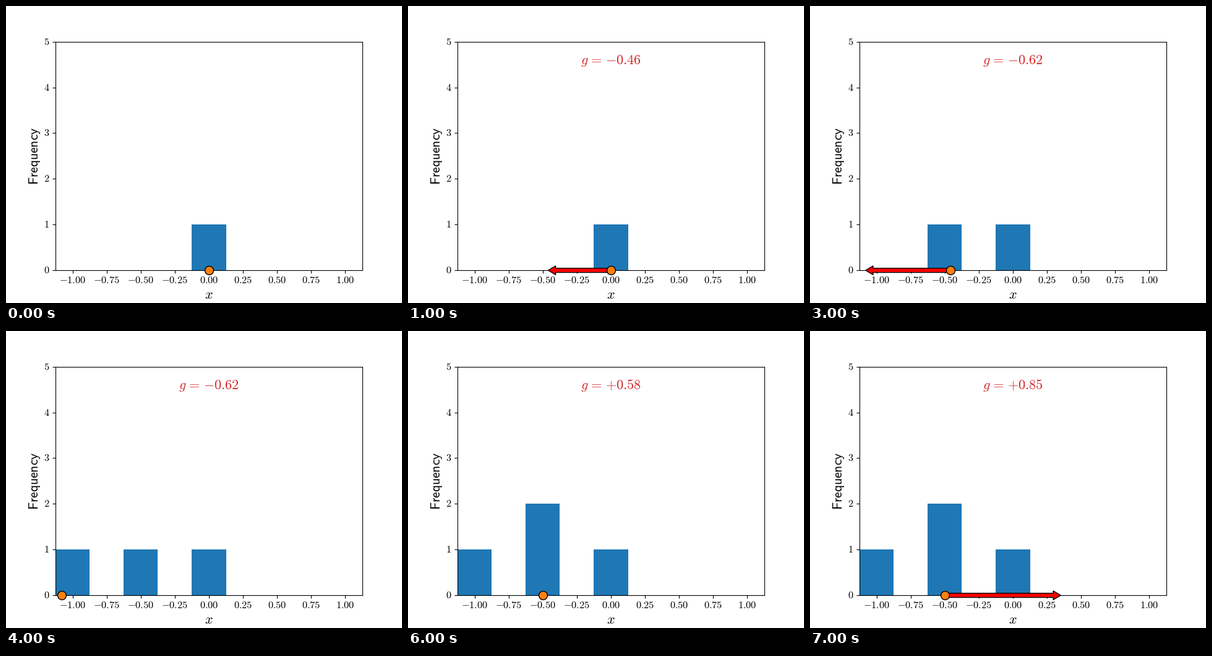
Recreate the animation shown at these times as a matplotlib script. Size 640 px wide and 480 px high, loop 8 s.

```python
import numpy as np
import matplotlib.pyplot as plt
from matplotlib.animation import FuncAnimation
from matplotlib.patches import Polygon
from matplotlib.transforms import ScaledTranslation

plt.rcParams["mathtext.fontset"] = "cm"

STEPS = [-0.46, -0.62, 0.58, 0.85]
PATH = np.concatenate([[0], np.cumsum(STEPS)])
WIDTH = 0.25
CENTERS = np.arange(-1, 1.01, WIDTH)
EDGES = np.append(CENTERS - WIDTH / 2, CENTERS[-1] + WIDTH / 2)
TICK_SIZE = 11.8

fig = plt.figure(figsize=(6.4, 4.8), dpi=100, facecolor="white")
ax = fig.add_axes([0.125, 0.11, 0.775, 0.77])
ax.set_xlim(EDGES[0], EDGES[-1])
ax.set_ylim(0, 5)
ax.set_xticks(CENTERS, [f"${c:.2f}$" for c in CENTERS], fontsize=TICK_SIZE)
ax.set_yticks(range(6), [f"${n}$" for n in range(6)], fontsize=TICK_SIZE)

# Math text sits about one pixel low, so lift the tick labels
lift = ScaledTranslation(0, 1 / 100, fig.dpi_scale_trans)
for tick_label in ax.get_xticklabels() + ax.get_yticklabels():
    tick_label.set_transform(tick_label.get_transform() + lift)

fig.text(328 / 640, 1 - 473 / 480, "$x$", fontsize=16, ha="center", va="baseline")
fig.text(52 / 640, 1 - 242 / 480, r"$\mathsf{Frequency}$", fontsize=15.5,
         rotation=90, rotation_mode="anchor", ha="center", va="baseline")

# Size of one pixel in data units
PX = 2.25 / 496
PY = 5 / 369.6

bars = ax.bar(CENTERS, np.zeros(len(CENTERS)), WIDTH, color="C0")
arrow = Polygon([(0, 0)], closed=True, fc="red", ec="black", lw=1,
                joinstyle="round", clip_on=False, zorder=3)
ax.add_patch(arrow)
ball, = ax.plot([0], [0], "o", ms=10, mfc="C1", mec="black", mew=1,
                clip_on=False, zorder=4)
label = ax.text(0, 4.5 + PY, "", color="C3", fontsize=16, ha="center")


def arrow_points(start, end, shaft=3.4, head=7.2, length=12):
    """Outline of a horizontal arrow; thicknesses are in pixels."""
    neck = end - np.sign(end - start) * length * PX
    upper = [(start, shaft), (neck, shaft), (neck, head), (end, 0)]
    lower = [(x, -y) for x, y in upper[-2::-1]]
    return [(x, y * PY) for x, y in upper + lower]


def step_text(g):
    sign = "+" if g > 0 else "-"
    return rf"$g\hspace{{0.116}}=\hspace{{0.116}}{{{sign}}}{abs(g):.2f}$"


def update(frame):
    # Even frames land on a position, odd frames show the next step
    done, stepping = divmod(frame, 2)
    counts, _ = np.histogram(PATH[:done + 1], EDGES)
    for bar, count in zip(bars, counts):
        bar.set_height(count)
    ball.set_xdata([PATH[done]])

    arrow.set_visible(bool(stepping))
    if stepping:
        arrow.set_xy(arrow_points(PATH[done], PATH[done + 1]))
    shown = done + stepping
    label.set_text(step_text(STEPS[shown - 1]) if shown else "")
    return [*bars, ball, arrow, label]


anim = FuncAnimation(fig, update, frames=8, interval=1000, repeat=True,
                     repeat_delay=0, blit=False)
plt.show()
```
